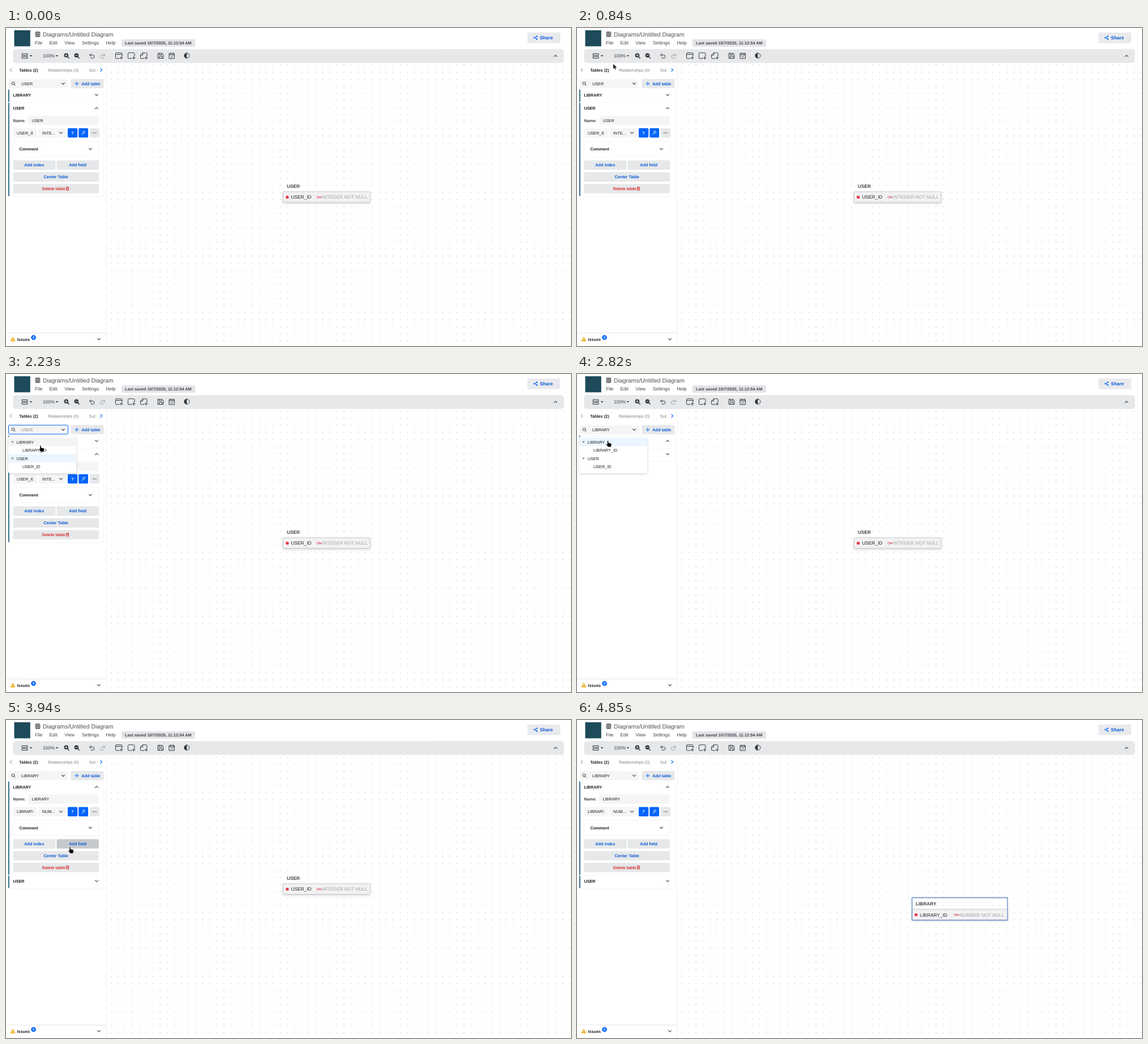
Animation of 998x561 px, one loop 6.47 s. Source, as an HTML page:

```html
<!DOCTYPE html>
<html lang="en">
<head>
<meta charset="utf-8">
<title>Diagram editor</title>
<style>
html, body { margin: 0; width: 100%; height: 100%; overflow: hidden; background: #fff; }
svg { display: block; }
text { font: 7.28px "Liberation Sans", Arial, sans-serif; fill: #1c1f23; text-rendering: geometricPrecision; white-space: pre; }
.b { font-weight: 700; }
.m { font-size: 8.32px; }
.title { font-size: 10.4px; fill: #4b4f54; }
.menu { fill: #3f444a; }
.dim { fill: #7d7f82; }
.type { fill: #a3a4a6; }
.link { fill: #0b5bd7; }
.danger { fill: #d92c2c; }
.white { fill: #fff; }
.mid { text-anchor: middle; }
.line { fill: none; stroke: #33383d; stroke-width: 1; stroke-linecap: round; stroke-linejoin: round; }
.btn { fill: #e6e8ea; }
.btn.on { fill: #c6cacd; }
.input { fill: #f5f5f5; }
.input.on { fill: #ebecec; }
.card { fill: #fff; stroke: #ececee; stroke-width: .6; }
.card.on { fill: #f5f5f5; }
</style>
</head>
<body>
<svg id="stage" width="100%" height="100%" viewBox="0 0 998 561"></svg>
<script>
const LOOP = 6470, PANEL_TOP = 108.7, CLOSED = 23.3, OPEN = 166;
const BLUE = '#0064fa';

const text = (x, y, s, cls = '') => `<text x="${x}" y="${y}" dy=".36em" class="${cls}">${s}</text>`;
const rect = (x, y, w, h, r, attrs) => `<rect x="${x}" y="${y}" width="${w}" height="${h}" rx="${r}" ${attrs}/>`;
const path = (x, y, d, attrs = '') => `<path class="line" transform="translate(${x} ${y})" d="${d}" ${attrs}/>`;
const chevron = (x, y, angle = 0, color = '#4a4e53', id = '') =>
  `<g transform="translate(${x} ${y})"><path ${id} class="line" transform="rotate(${angle})" d="M-2.6-1.3 0 1.3 2.6-1.3" style="stroke:${color};stroke-width:1.1"/></g>`;
const caret = (x, y, color = '#33383d') => `<path transform="translate(${x} ${y})" d="M-2.3-1.2h4.6L0 1.4z" fill="${color}"/>`;
const clipped = (x, y, w, s, cls = '') => `<svg x="${x}" y="${y - 6}" width="${w}" height="12">${text(0, 6, s, cls)}</svg>`;
const button = (x, y, w, label, cls = 'link') =>
  rect(x, y - 8.2, w, 16.4, 1.6, 'class="btn hot"') + text(x + w / 2, y, label, `b mid ${cls}`);

function header() {
  const menus = [[51, 'File'], [76.5, 'Edit'], [103.5, 'View'], [134, 'Settings'], [176.5, 'Help']];
  return rect(0, 0, 998, 63, 0, 'fill="#fff"') +
    rect(14.5, 4, 28.3, 28.3, 0, 'fill="#1d4b5c"') +
    rect(51.5, 6.3, 9, 9.6, 1.8, 'fill="#77797c"') +
    path(52, 9.4, 'M0 0h8M0 3.3h8', 'style="stroke:#c4c5c7;stroke-width:.6"') +
    text(65, 11, 'Diagrams/Untitled Diagram', 'title') +
    menus.map(([x, s]) => text(x, 26.3, s, 'm menu')).join('') +
    rect(204, 20, 130, 13, 1.5, 'fill="#e3e4e7"') +
    text(210, 26.6, 'Last saved 10/7/2025, 11:12:54 AM', 'b menu') +
    rect(921, 8, 58, 18.7, 1.6, 'fill="#e9eaed"') +
    path(932.5, 14, 'M5 .8 1 3.1 5 5.4', `style="stroke:${BLUE}"`) +
    [[937.6, 14.7], [933.3, 17.1], [937.6, 19.5]].map(([x, y]) => `<circle cx="${x}" cy="${y}" r="1.3" fill="${BLUE}"/>`).join('') +
    text(943, 17, 'Share', 'b m link');
}

function toolbar() {
  const zoom = (x, d) => `<circle cx="${x - .6}" cy="48.3" r="3.8" fill="#33383d"/>` +
    path(x, 49, 'M2.3 2.2 4.3 4.2', 'style="stroke-width:1.5"') +
    path(x - .6, 48.3, d, 'style="stroke:#fff;stroke-width:.8"');
  const plus = x => path(x, 52.7, 'M-2.4 0h4.8M0-2.4v4.8');
  return rect(12.5, 37.3, 973, 24.4, 5, 'fill="#e6e8ea"') +
    path(28.5, 45.3, 'M0 0h9.5v3H0zM0 5h9.5v3H0z') + caret(44, 49.2) +
    text(65, 49.2, '100%', 'm menu') + caret(90, 49.2) +
    zoom(107, 'M-1.9 0h3.8M0-1.9v3.8') + zoom(125, 'M-1.9 0h3.8') +
    path(147.8, 45, 'M2.7 0 0 2.7 2.7 5.4M0 2.7h5.5a2.7 2.7 0 0 1 0 5.4H2.2') +
    path(174.8, 45, 'M-2.7 0 0 2.7-2.7 5.4M0 2.7h-5.5a2.7 2.7 0 0 0 0 5.4h3.3', 'style="stroke:#9b9ea2"') +
    path(193.5, 43.8, 'M6.5 10H1.5Q0 10 0 8.500V1.500Q0 0 1.500 0h8.500q1.500 0 1.500 1.500V6M0 2.800h11.500') + plus(203.7) +
    path(215.5, 43.8, 'M6.500 10H1.500Q0 10 0 8.500V1.500Q0 0 1.500 0h8.500q1.500 0 1.500 1.500V6') + plus(225.6) +
    path(237.5, 43.8, 'M6.500 10H1.500Q0 10 0 8.500V4L4 0h6q1.500 0 1.500 1.500V6M0 4h4V0') + plus(247.6) +
    path(268.6, 44.6, 'M0 0h7.200L9.300 2.100V9H0zM2 0v3h4.500V0M2 9V5.500h5.300V9') +
    path(288.4, 44.9, 'M0 0h9v9H0zM2.300-1v2M6.700-1v2M0 2.400h9M2.500 5.500 4 7l2.700-2.700') +
    path(319.4, 48.7, 'M0-4.600a4.600 4.600 0 0 1 0 9.200 4.600 4.600 0 0 1 0-9.200') +
    `<path transform="translate(319.4 48.7)" d="M0-4.600a4.600 4.600 0 0 0 0 9.200z" fill="#33383d"/>` +
    chevron(970.7, 49.2, 180);
}

function panel(id, name, field, type) {
  return `<svg id="${id}" x="0" y="${PANEL_TOP}" width="176" height="${CLOSED}">
    <rect x="4" y="-1.5" width="2" height="100%" fill="#175e7a"/>
    <rect x="6" y="-.8" width="166" height="100%" fill="#fff" stroke="#efeff0" stroke-width=".6"/>
    ${rect(6, -2, 167, 4, 0, 'fill="#fff"')}
    ${text(12.4, 9.4, name, 'b')}${chevron(160, 9.4, 0, '#4a4e53', 'class="arrow"').replace('class="arrow" class="line"', 'class="line arrow"')}
    <g class="body">
      ${text(12.4, 31, 'Name:', 'b menu')}${rect(39, 22.800, 125, 16.400, 1.600, 'class="input hot"')}${text(45.500, 31, name)}
      ${rect(12.500, 44.800, 42, 16.400, 1.600, 'class="input hot"')}${clipped(19, 53, 28.600, field)}
      ${rect(57.500, 44.800, 48, 16.400, 1.600, 'class="input hot"')}${text(64, 53, type)}${chevron(97, 53)}
      ${rect(109, 44.800, 17.300, 16.400, 1.600, `fill="${BLUE}"`)}${text(117.600, 53, '?', 'b mid white')}
      ${rect(128.300, 44.800, 16.800, 16.400, 1.600, `fill="${BLUE}"`)}
      ${path(136.700, 53, 'M-2.800 3.200 0 .4M-.2 .2a1.900 1.900 0 1 1 2 0q-1 .8-2 0', 'style="stroke:#fff;stroke-width:.9"')}
      ${rect(148, 44.800, 17, 16.400, 1.600, 'class="btn"')}
      ${[-2.600, 0, 2.600].map(d => `<circle cx="${156.500 + d}" cy="53" r=".8" fill="#33383d"/>`).join('')}
      ${rect(12.300, 68, 151.700, 27, 1.600, 'class="card hot"')}${text(23.400, 81.500, 'Comment', 'b')}${chevron(149, 81.500)}
      ${button(12.300, 109.800, 75.200, 'Add index')}${button(89.500, 109.800, 74.500, 'Add field')}
      ${button(12.300, 130.700, 151.700, 'Center Table')}
      ${rect(12.300, 143.300, 151.700, 16.400, 1.600, 'class="btn hot"')}${text(63.800, 151.500, 'Delete table', 'b danger')}
      ${path(108.600, 151.500, 'M-2.700-2h5.400M-2-2v4.800h4V-2M-1-3.200h2M-.6-.5v2M.6-.5v2', 'style="stroke:#d92c2c;stroke-width:.8"')}
    </g>
  </svg>`;
}

function sidebar() {
  return rect(0, 62, 177, 499, 0, 'fill="#fff"') +
    path(177, 62, 'M0 0v499', 'style="stroke:#e9eaeb;stroke-width:.7"') +
    chevron(8.500, 74, 90, '#a5a7aa') + text(23.200, 74, 'Tables (2)', 'b') +
    text(74, 74, 'Relationships (0)', 'dim') + clipped(146.800, 74, 11, 'Subject', 'dim') + chevron(168.200, 74, -90, BLUE) +
    rect(4.500, 90.200, 105, 15.800, 1.600, 'id="select" class="input"') +
    path(12.600, 97.700, 'M1.900 1.900 3.600 3.600M2.400 0a2.400 2.400 0 1 1-4.800 0 2.400 2.400 0 0 1 4.800 0') +
    `<text id="choice" x="27" y="98.200" dy=".36em"></text>` + chevron(101, 98.200) +
    rect(27, 94, .6, 8.500, 0, 'id="caret" fill="#1c1f23"') +
    rect(114.500, 90, 58, 16.300, 1.600, 'class="btn"') +
    path(125, 98.200, 'M-3 0h6M0-3v6', `style="stroke:${BLUE}"`) + text(133.300, 98.200, 'Add table', 'b link') +
    panel('library', 'LIBRARY', 'LIBRARY_ID', 'NUM...') + panel('user', 'USER', 'USER_ID', 'INTE...') +
    path(0, 538, 'M0 0h177', 'style="stroke:#e4e5e7"') +
    `<path d="M12 545.300 16 552.200H8z" fill="#f0b429" stroke="#f0b429" stroke-linejoin="round"/>` +
    path(12, 549, 'M0-1.500V.8M0 2.300v.1', 'style="stroke:#fff;stroke-width:.8"') +
    text(19.500, 549, 'Issues', 'b') + `<circle cx="48.600" cy="546" r="4.300" fill="${BLUE}"/>` +
    `<text x="48.600" y="546" dy=".36em" class="b mid white" style="font-size:6px">0</text>` + chevron(164, 549);
}

function dropdown() {
  const row = (y, s, child) => child ? text(29, y, s) : caret(11.500, y, '#6b6e72') + text(18.500, y, s);
  return `<g id="dropdown">${rect(4, 110, 120, 65, 3, 'fill="#fff" filter="url(#shadow)"')}
    ${rect(4, 112.700, 120, 14.500, 0, 'id="libraryRow"')}${rect(4, 141.700, 120, 14.500, 0, 'id="userRow"')}
    ${row(120, 'LIBRARY')}${row(134.500, 'LIBRARY_ID', true)}${row(149, 'USER')}${row(163.500, 'USER_ID', true)}</g>`;
}

function entity(id, x, y, w, name, field, type, typeX) {
  const row = y + 20.400;
  const selected = id === 'libraryTable';
  return `<g id="${id}">
    ${rect(x, row, w, 18.600, .8, 'fill="#f2f2f3" stroke="#c3c4c6" stroke-width=".9" filter="url(#shadow)"')}
    ${selected ? rect(x, y - .3, w, 39.800, 1, 'fill="none" stroke="#7796cf" stroke-width="1.600"') : ''}
    ${text(x + 6.500, y + 10.200, name, 'b m menu')}
    <circle cx="${x + 7.300}" cy="${row + 9.500}" r="2.700" fill="#e8384b"/>
    ${text(x + 14, row + 9.500, field, 'm')}
    ${path(typeX - 9.700, row + 9.500, 'M4 0a1.900 1.900 0 1 1-3.800 0A1.900 1.900 0 0 1 4 0M4-.6h4.500V.7H4M6.600 .7v.6', 'style="stroke:#dd5b68;stroke-width:.9"')}
    ${text(typeX, row + 9.500, type, 'm type')}</g>`;
}

const stage = document.getElementById('stage');
stage.innerHTML = `<defs>
  <pattern id="dots" x="179" y="59.400" width="12.475" height="12.475" patternUnits="userSpaceOnUse">
    <circle cx="6.200" cy="6.200" r=".6" fill="#a0a4a8"/></pattern>
  <filter id="shadow" x="-20%" y="-40%" width="140%" height="190%">
    <feDropShadow dx="0" dy="1.500" stdDeviation="2" flood-opacity=".17"/></filter></defs>
  ${rect(178, 62, 820, 499, 0, 'fill="url(#dots)"')}
  ${entity('userTable', 489.500, 268.500, 153.500, 'USER', 'USER_ID', 'INTEGER NOT NULL', 558.300)}
  ${entity('libraryTable', 591.700, 313.700, 168.800, 'LIBRARY', 'LIBRARY_ID', 'NUMBER NOT NULL', 675.800)}
  ${header()}${toolbar()}${sidebar()}${dropdown()}
  <g id="cursor" stroke="#fff" stroke-width=".5" stroke-linejoin="round">
    <path id="arrow" d="M0 0v9.400l2.100-2 1.500 3.400 1.500-.7-1.500-3.200h2.900z"/>
    <path id="hand" d="M-1 .8q1-1.600 2 0v3l4 .9q1.600.5 1.400 2.300L5.600 11.200H.5L-2.900 7q-.5-1.600 1-1.100l.9.800z"/></g>`;

const el = Object.fromEntries([...stage.querySelectorAll('[id]')].map(node => [node.id, node]));
const hotspots = [...el.library.querySelectorAll('.hot')];
const show = (node, visible) => node.setAttribute('visibility', visible ? 'visible' : 'hidden');
const progress = (t, a, b) => Math.min(1, Math.max(0, (t - a) / (b - a)));
const smooth = p => p * p * (3 - 2 * p);

// Each stop: arrival time, x, y.
const route = [[700, 336, 561], [840, 64, 63], [1060, 64, 63], [1320, 60, 98], [1500, 60, 98], [1660, 59.500, 118],
  [2010, 59.500, 118], [2230, 61, 126], [2640, 54.500, 117.500], [2900, 54.500, 117.500], [3120, 57, 118.500],
  [3300, 57, 118.500], [3940, 113, 224], [3960, 113, 224], [4100, 108, 236.500]];

function pointer(t) {
  const next = route.findIndex(stop => stop[0] > t);
  if (next < 0) return route.at(-1).slice(1);
  if (next === 0) return route[0].slice(1);
  const [t0, x0, y0] = route[next - 1], [t1, x1, y1] = route[next];
  const p = smooth(progress(t, t0, t1));
  return [x0 + (x1 - x0) * p, y0 + (y1 - y0) * p];
}

function setPanel(node, y, height, open) {
  node.setAttribute('y', y);
  node.setAttribute('height', height);
  node.querySelector('.arrow').setAttribute('transform', `rotate(${open ? 180 : 0})`);
  show(node.querySelector('.body'), height > CLOSED);
}

function render() {
  const t = performance.now() % LOOP;
  const picked = t >= 2820, centered = t >= 4300;
  const focused = t >= 1440 && !picked;

  const height = CLOSED + (OPEN - CLOSED) * smooth(progress(t, 2830, 3090));
  setPanel(el.library, PANEL_TOP, height, picked);
  setPanel(el.user, PANEL_TOP + height, picked ? CLOSED : OPEN, !picked);

  el.choice.textContent = picked ? 'LIBRARY' : 'USER';
  el.choice.style.fill = focused && t < 2670 ? '#8a8c90' : '#1c1f23';
  el.select.style.stroke = focused ? BLUE : 'none';
  show(el.caret, focused && t < 2640 && (t - 1500) % 1000 < 500);

  const opacity = progress(t, 1440, 1560) * (1 - progress(t, 2830, 2930));
  el.dropdown.setAttribute('opacity', opacity);
  el.dropdown.setAttribute('transform', `translate(0 110) scale(1 ${.8 + .2 * opacity}) translate(0 -110)`);
  el.libraryRow.style.fill = picked ? '#eaf5ff' : t > 1600 ? '#f4f4f5' : 'none';
  el.userRow.style.fill = picked ? 'none' : '#eaf5ff';

  show(el.userTable, !centered);
  show(el.libraryTable, centered);

  const [x, y] = pointer(t);
  const present = t >= 700 && t < 4830;
  const handy = y > 89 && t > 1060;
  el.cursor.setAttribute('transform', `translate(${x} ${y})`);
  show(el.arrow, present && !handy);
  show(el.hand, present && handy);
  for (const spot of hotspots) {
    const box = spot.getAttribute.bind(spot);
    const dx = x - box('x'), dy = y - PANEL_TOP - box('y');
    spot.classList.toggle('on', present && t > 3300 && dx > 0 && dx < +box('width') && dy > 0 && dy < +box('height'));
  }
  requestAnimationFrame(render);
}
render();
</script>
</body>
</html>
```
